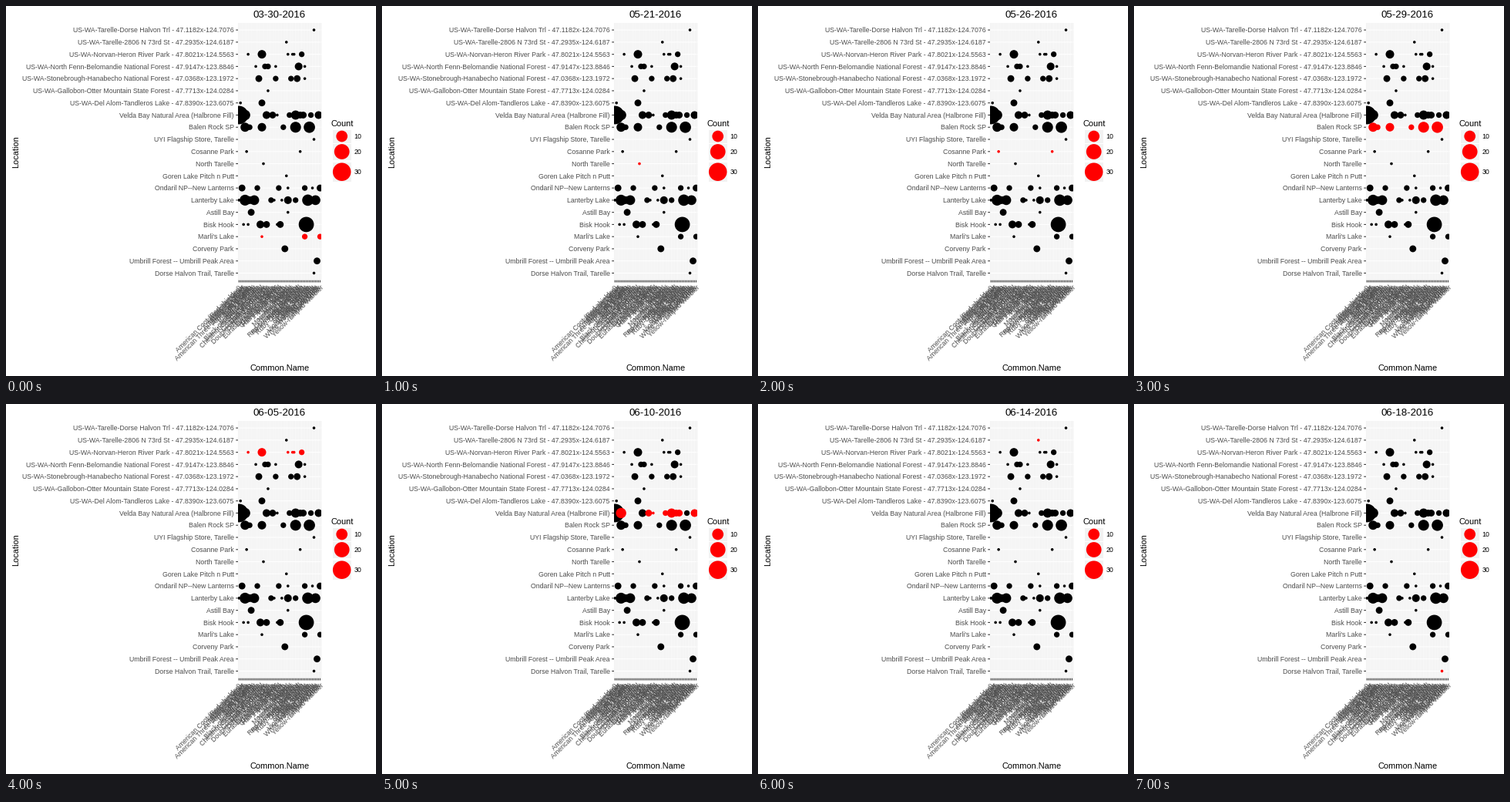
Recreate the animation shown at these times as a matplotlib script. Size 480x480 px, loop 8000 ms.

```python
import matplotlib.pyplot as plt
from matplotlib.animation import FuncAnimation
from matplotlib.patches import Circle, Rectangle

plt.rcParams["font.family"] = "Liberation Sans"

SIZE, DPI = 480, 72  # at 72 dpi one point is one pixel
LEFT, RIGHT, TOP, BOTTOM = 301, 408.6, 21.6, 355.8
GREY, TICK, PANEL = "#4d4d4d", "#333333", "#ebebeb"

# place, species seen once, {species: count}
SIGHTINGS = [
    ("US-WA-Tarelle-Dorse Halvon Trl - 47.1182x-124.7076", [49], {}),
    ("US-WA-Tarelle-2806 N 73rd St - 47.2935x-124.6187", [31], {}),
    ("US-WA-Norvan-Heron River Park - 47.8021x-124.5563", [6, 32, 35, 36], {15: 5, 41: 2}),
    ("US-WA-North Fenn-Belomandie National Forest - 47.9147x-123.8846",
     [11, 24, 43], {17: 2, 19: 2, 39: 4}),
    ("US-WA-Stonebrough-Hanabecho National Forest - 47.0368x-123.1972",
     [43], {13: 3, 24: 2, 34: 2, 38: 3}),
    ("US-WA-Gallobon-Otter Mountain State Forest - 47.7713x-124.0284", [19], {}),
    ("US-WA-Del Alom-Tandleros Lake - 47.8390x-123.6075", [1], {15: 3}),
    ("Velda Bay Natural Area (Halbrone Fill)", [25],
     {0: 31, 4: 8, 18: 4, 22: 3, 33: 2, 37: 6, 40: 3, 42: 3, 47: 2, 52: 4}),
    ("Balen Rock SP", [], {4: 6, 7: 2, 15: 5, 29: 2, 37: 9, 46: 10}),
    ("UYI Flagship Store, Tarelle", [49], {}),
    ("Cosanne Park", [5, 40], {}),
    ("North Tarelle", [16], {}),
    ("Goren Lake Pitch n Putt", [31], {}),
    ("Ondaril NP--New Lanterns", [32, 48], {2: 3, 12: 2, 26: 2, 43: 2, 53: 3}),
    ("Lanterby Lake", [0, 23, 28],
     {4: 9, 7: 4, 10: 7, 21: 2, 32: 4, 37: 2, 45: 10, 50: 7}),
    ("Astill Bay", [32], {8: 3}),
    ("Bisk Hook", [3, 6, 25], {14: 4, 18: 3, 27: 3, 44: 20}),
    ("Marli's Lake", [15], {43: 2, 53: 2}),
    ("Corveny Park", [], {30: 3}),
    ("Umbrill Forest -- Umbrill Peak Area", [], {51: 3}),
    ("Dorse Halvon Trail, Tarelle", [49], {}),
]

SPECIES = """American Coot (Red-shielded), American Crow, American Dipper,
American Goldfinch, American Robin, American Three-toed Woodpecker,
American Wigeon, Bald Eagle, Bank Swallow, Barn Swallow, Belted Kingfisher,
Black-capped Chickadee, Canada Goose, Chestnut-backed Chickadee, Cinnamon Teal,
Cliff Swallow, Common Merganser, Dark-eyed Junco, Double-crested Cormorant,
Downy Woodpecker, Dunlin, Dusky Grouse, Eurasian Collared-Dove,
Evening Grosbeak, Gadwall, Great Blue Heron, Green-winged Teal,
Hairy Woodpecker, Hermit Thrush, House Finch, Killdeer, Mallard, Marsh Wren,
Mountain Bluebird, Northern Flicker, Osprey, Pine Siskin,
Red-breasted Nuthatch, Red-winged Blackbird, Ring-billed Gull, Rock Pigeon,
Ruby-crowned Kinglet, Song Sparrow, Spotted Towhee, Swamp Sparrow,
Tree Swallow, Varied Thrush, Violet-green Swallow, Western Tanager,
White-crowned Sparrow, Winter Wren, Wood Duck, Yellow Warbler,
Yellow-rumped Warbler""".replace("\n", " ").split(", ")

# date, highlighted row, species left black in that row
DAYS = [
    ("03-30-2016", 17, ()),
    ("05-21-2016", 11, ()),
    ("05-26-2016", 10, ()),
    ("05-29-2016", 8, ()),
    ("06-05-2016", 2, ()),
    ("06-10-2016", 7, (0, 18, 47)),
    ("06-14-2016", 1, ()),
    ("06-18-2016", 20, ()),
]


def col_x(col):
    return 302.2 + 1.986 * col


def row_y(row):
    return 31.1 + 15.77 * row


def radius(count):
    return 1.8 + 1.85 * (count - 1) ** 0.5


fig = plt.figure(figsize=(SIZE / DPI, SIZE / DPI), dpi=DPI, facecolor="white")
ax = fig.add_axes([0, 0, 1, 1])
ax.set(xlim=(0, SIZE), ylim=(SIZE, 0))
ax.axis("off")


def line(xs, ys, color, z):
    ax.plot(xs, ys, color=color, lw=1.07, solid_capstyle="butt", snap=False, zorder=z)


def label(x, y, text, size=8.8, color="black", **kw):
    return ax.text(x, y, text, fontsize=size, color=color, **kw)


panel = Rectangle((LEFT, TOP), RIGHT - LEFT, BOTTOM - TOP, color=PANEL, lw=0, zorder=0)
ax.add_patch(panel)

for col, bird in enumerate(SPECIES):
    x = col_x(col)
    line([x, x], [TOP, BOTTOM], "white", 1)
    line([x, x], [BOTTOM, BOTTOM + 2.75], TICK, 2)
    label(x, BOTTOM + 5, bird, color=GREY, rotation=45, rotation_mode="anchor",
          ha="right", va="top")

dots = {}
for row, (place, singles, counts) in enumerate(SIGHTINGS):
    y = row_y(row)
    line([LEFT, RIGHT], [y, y], "white", 1)
    line([LEFT - 2.75, LEFT], [y, y], TICK, 2)
    label(LEFT - 5.2, y + 3.2, place, color=GREY, ha="right")
    for col, count in {**dict.fromkeys(singles, 1), **counts}.items():
        dot = Circle((col_x(col), y), radius(count), lw=0)
        ax.add_patch(dot)
        dot.set_clip_path(panel)
        dots[row, col] = dot

# legend
label(421, 156.5, "Count", 11)
for count, y, height in [(10, 169, 17.3), (20, 189, 21.5), (30, 215.2, 25.6)]:
    ax.add_patch(Rectangle((423, y - height / 2), 25.4, height, fc="#f2f2f2",
                           ec="white", lw=1))
    ax.add_patch(Circle((435.7, y), radius(count), color="red", lw=0, zorder=3))
    label(451.6, y + 3.2, str(count))

label(354.8, 473, "Common.Name", 11, ha="center")
label(16, 189, "Location", 11, rotation=90, rotation_mode="anchor", ha="center")
title = label(355, 15.3, "", 13.2, ha="center")


def update(i):
    date, day_row, skipped = DAYS[i]
    title.set_text(date)
    for (row, col), dot in dots.items():
        lit = row == day_row and col not in skipped
        dot.set_facecolor("red" if lit else "black")
        dot.set_zorder(4 if lit else 3)
    return [title, *dots.values()]


anim = FuncAnimation(fig, update, frames=len(DAYS), interval=1000, repeat=True,
                     repeat_delay=0, blit=False)
plt.show()
```
